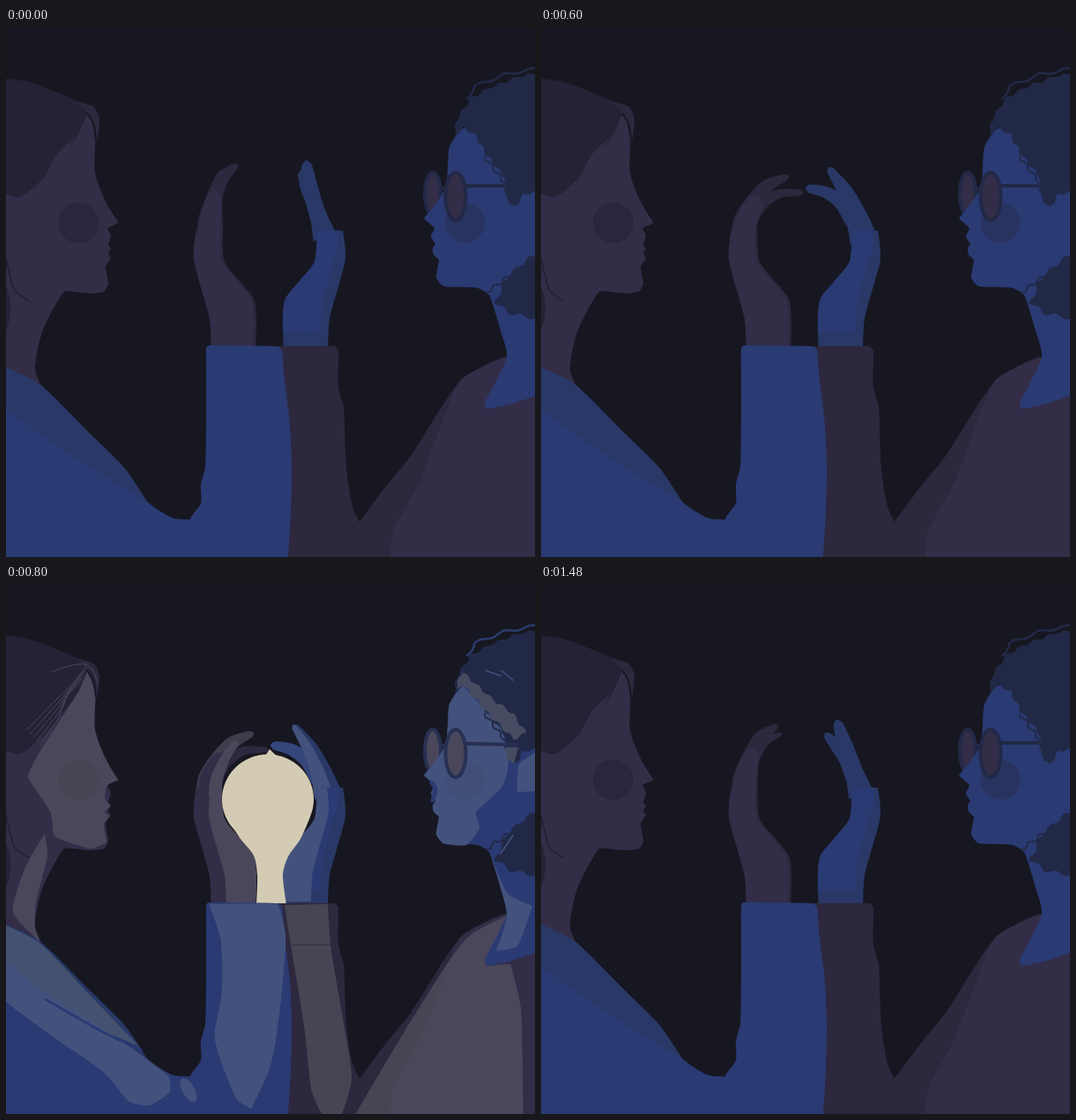
These frames come from a looping animation (600 px wide and 600 px high, 1520 ms). An HTML page with a canvas:

```html
<!DOCTYPE html>
<html lang="en">
<head>
<meta charset="utf-8">
<title>Hands around a light</title>
<style>
html, body { margin: 0; width: 100%; height: 100%; overflow: hidden; background: #171721; }
canvas { display: block; width: 600px; height: 600px; }
</style>
</head>
<body>
<canvas id="stage" width="600" height="600"></canvas>
<script>
const ctx = document.getElementById('stage').getContext('2d');
const LOOP = 1520, STEP = 40;
const night = '#171721', plum = '#332d48', plumDark = '#2d283e', plumLit = '#4a475b', greyLit = '#474553';
const blue = '#2a3a73', blueDark = '#293866', blueLit = '#43527c';
const hairL = '#242235', hairR = '#222947', hairLit = '#474b62', glow = '#d3cbb3', wire = '#e9e3cb';

const points = s => typeof s === 'string' ? s.trim().split(/\s+/).map(p => p.split(',').map(Number)) : s;
const mix = (a, b, k) => a.map((v, i) => v + (b[i] - v) * k);

// Smooth curve through the points; the sharper a turn, the less it is rounded.
function trace(shape, closed) {
  const pts = points(shape), n = pts.length;
  const at = i => closed ? pts[(i + n) % n] : pts[Math.max(0, Math.min(n - 1, i))];
  const handle = i => {
    const [a, b, c] = [at(i - 1), at(i), at(i + 1)];
    const u = [b[0] - a[0], b[1] - a[1]], v = [c[0] - b[0], c[1] - b[1]];
    const lu = Math.hypot(...u) || 1, lv = Math.hypot(...v) || 1;
    const straight = Math.max(0, (u[0] * v[0] + u[1] * v[1]) / (lu * lv));
    const k = Math.min(lu, lv) / 6 * straight;
    return [k * (u[0] / lu + v[0] / lv), k * (u[1] / lu + v[1] / lv)];
  };
  ctx.beginPath();
  ctx.moveTo(...pts[0]);
  for (let i = 0; i < n - (closed ? 0 : 1); i++) {
    const b = at(i), c = at(i + 1), h = handle(i), g = handle(i + 1);
    ctx.bezierCurveTo(b[0] + h[0], b[1] + h[1], c[0] - g[0], c[1] - g[1], ...c);
  }
  if (closed) ctx.closePath();
}
function fill(color, shape) {
  trace(shape, true);
  ctx.fillStyle = color;
  ctx.fill();
}
function line(color, width, shape) {
  trace(shape, false);
  ctx.strokeStyle = color;
  ctx.lineWidth = width;
  ctx.lineCap = ctx.lineJoin = 'round';
  ctx.stroke();
}
function oval(color, x, y, rx, ry, turn = 0, rim) {
  ctx.beginPath();
  ctx.ellipse(x, y, rx, ry, turn, 0, 2 * Math.PI);
  ctx.fillStyle = color;
  ctx.fill();
  if (!rim) return;
  ctx.strokeStyle = rim;
  ctx.lineWidth = 4;
  ctx.stroke();
}
// The same outline, shifted and clipped to itself, leaves a band of shade.
function shade(shape, color, dx, dy) {
  ctx.save();
  trace(shape, true);
  ctx.clip();
  ctx.translate(dx, dy);
  fill(color, shape);
  ctx.restore();
}
// Wavy hair edge along a few points.
function ripple(shape, height, wave) {
  const pts = points(shape), out = [];
  let run = 0;
  for (let i = 0; i < pts.length - 1; i++) {
    const [x, y] = pts[i], dx = pts[i + 1][0] - x, dy = pts[i + 1][1] - y, len = Math.hypot(dx, dy);
    for (let d = 0; d < len; d += 4) {
      const s = height * Math.sin((run + d) / wave * 2 * Math.PI);
      out.push([x + (dx * d - dy * s) / len, y + (dy * d + dx * s) / len]);
    }
    run += len;
  }
  return [...out, pts[pts.length - 1]];
}
// Tapered finger along a spine of x, y, width.
function limb(color, spine, scale = 1) {
  const near = [], far = [];
  spine.forEach(([x, y, w], i) => {
    const a = spine[Math.max(0, i - 1)], b = spine[Math.min(spine.length - 1, i + 1)];
    const dx = b[0] - a[0], dy = b[1] - a[1], k = w * scale / 2 / Math.hypot(dx, dy);
    near.push([x - dy * k, y + dx * k]);
    far.unshift([x + dy * k, y - dx * k]);
    if (i === spine.length - 1) near.push([x + dx * k, y + dy * k]);
  });
  fill(color, [...near, ...far]);
}

const palm = '233,364 231,330 213,262 216,230 245,230 248,265 266,288 281,307 284,330 283,364';
const finger = (open, cupped) => ({ open: points(open), cupped: points(cupped) });
const fingers = {
  leftIndex: finger('231,240,30 232,218,28 237,190,18 247,168,15 261,156,6', '230,240,30 232,220,28 243,197,21 257,179,15 278,169,7'),
  leftThumb: finger('237,205,14 240,190,12 247,172,10 260,160,4', '239,220,12 250,200,14 270,188,10 295,187,6'),
  rightIndex: finger('362,238,28 353,208,18 344,178,18 341,155,11', '366,240,32 357,212,24 344,184,17 328,161,8'),
  rightThumb: finger('352,220,12 346,196,13 340,180,13 335,165,8', '353,222,14 341,198,17 322,186,13 304,182,9')
};

function hands(bend, lit) {
  const spine = name => fingers[name].open.map((p, i) => mix(p, fingers[name].cupped[i], bend));
  const leftIndex = spine('leftIndex'), rightIndex = spine('rightIndex');

  limb(plumDark, spine('leftThumb'));
  limb(lit ? '#3f3c4b' : plumDark, leftIndex);
  fill(plumDark, palm);
  shade(palm, plum, -3, 0);
  limb(plum, leftIndex.slice(0, 3), .85);
  if (lit) {
    limb(plumLit, leftIndex.slice(0, 4).map(([x, y, w]) => [x + w / 4, y, w / 2]));
    shade(palm, plumLit, 17, 0);
  }

  limb(lit ? '#35467c' : blueDark, spine('rightThumb'));
  limb(blueDark, rightIndex);
  if (lit) limb(blueLit, rightIndex.map(([x, y, w]) => [x - w / 6, y, w * .67]));
  ctx.save();
  ctx.translate(598, 0);
  ctx.scale(-1, 1);
  fill(blueDark, palm);
  shade(palm, blue, 8, -18);
  if (lit) shade(palm, blueLit, 19, -5);
  ctx.restore();
}

function bulb(filament) {
  oval(glow, 297, 243, 52, 51);
  fill(glow, '283,198 295,192 299,186 305,192 315,198');
  fill(glow, '250,263 266,288 281,307 285,330 284,362 318,362 314,328 320,308 334,288 345,263');
  if (!filament) return;
  line(wire, 4, '282,257 284,264 290,264 293,256 299,263 304,256 308,263 314,262 315,255');
  line(wire, 1.5, '289,265 293,290 295,311');
  line(wire, 1.5, '308,265 302,303');
}

function leftWoman(lit) {
  fill(plum, `-20,80 92,92 101,122 101,164 113,197 128,221 115,227 119,236 116,246 119,250 116,256 119,261
    113,271 116,290 111,299 96,301 66,299 41,345 33,388 42,410 -20,410`);
  if (lit) {
    fill(plumLit, `92,98 101,122 101,164 113,197 127,221 115,227 112,242 118,250 112,258 118,262 111,271
      114,292 96,299 55,285 50,257 25,218 35,195 84,118`);
    fill(plumLit, '44,282 47,307 34,360 33,388 40,406 8,372 20,325');
  }
  oval(lit ? greyLit : '#2b2640', 82, 221, 23, 23);
  fill(hairL, '-20,55 25,61 55,72 85,85 93,94 80,124 45,168 15,192 -20,178');
  fill(plumDark, '80,83 99,89 106,102 103,131 94,99');
  line(night, 2, '92,97 99,108 102,127');
  oval(hairL, -9, 318, 14, 32);
  line(hairL, 2, '0,262 10,298 25,309');
  if (lit) {
    for (let i = 0; i < 5; i++) {
      line('#4b475d', 1, [[91 - i, 92 + i * 4], [78 - i * 2, 109 + i * 4], [55 + i, 132 + i * 5], [23 + i * 4, 165 + i * 4]]);
    }
    line('#4b475d', 1, '50,99 75,91 90,90 99,97 104,112');
  } else {
    fill(plum, '78,124 58,143 44,169 66,145');
  }

  const shoulder = '-20,376 0,385 38,404 95,460 135,500 160,537';
  fill(blue, shoulder + ' 190,556 212,558 225,620 -20,620');
  fill(blueDark, shoulder + ' 60,475 -20,415');
  if (lit) {
    fill('#445170', '-20,378 35,404 95,465 151,523 80,490 -20,410');
    fill(blueLit, '-20,412 45,462 132,518 185,558 186,575 163,590 140,586 110,552 50,510 -20,455');
    line(blue, 3, '45,470 110,507 153,527');
  }
}

function rightWoman(lit) {
  const rim = lit ? '#283052' : hairR, lens = lit ? plumLit : plum;
  fill(plumDark, `308,361 373,361 377,366 377,408 383,430 386,500 393,543 401,560 430,521 460,484
    515,401 568,373 620,400 620,620 308,620`);
  fill(plum, '620,355 568,373 515,400 470,513 438,575 436,620 620,620');
  if (lit) {
    fill(plumLit, '388,615 447,515 507,420 528,396 568,375 544,432 572,430 584,480 587,620');
    fill(greyLit, '388,615 447,515 503,430 470,513 438,575 436,620');
    fill(greyLit, '316,363 365,362 368,408 380,480 392,560 380,602 360,602 347,575 338,500 323,408');
    line(plumDark, 1, '325,408 368,408');
  }

  oval(lens, 484, 188, 9, 24, 0, rim);
  const profile = '518,114 503,135 498,182 474,216 486,227 482,237 487,245 484,250 485,257 491,263 488,283 496,293';
  fill(blue, profile + ' 535,295 548,303 560,340 568,373 543,425 545,432 570,427 620,408 620,110');
  if (lit) {
    fill(blueLit, profile + ' 522,295 537,276 533,258 563,228 570,200 562,165');
    line(blue, 5, '483,224 487,232 484,244');
    fill(blueLit, '620,178 582,203 580,235 620,232');
    fill(blueLit, '548,302 569,350 597,364 580,410 556,415 568,373');
  }
  oval(lit ? '#404e78' : '#283360', 521, 221, 22.5, 22.5);
  fill(hairR, [
    ...ripple('620,184 588,188 577,204 567,192 565,168 545,144 532,121 518,113', 1.5, 16),
    ...ripple('508,124 512,102 527,80 550,67 585,54 620,50', 1.5, 18)
  ]);
  line(lit ? '#2a3a6c' : hairR, 2.5, ripple('523,80 532,66 565,53 602,46', 1.5, 30));
  line(hairR, 2, ripple('543,146 566,176', 2, 15));
  fill(hairR, ripple('620,250 590,263 568,283 555,311 570,323 620,334', 2, 22));
  line(hairR, 2, ripple('545,300 574,279', 2, 15));
  if (lit) {
    fill(hairLit, ripple('509,121 517,98 550,128 575,146 590,168 576,175 545,144 518,113', 1.5, 18));
    fill(hairLit, '566,184 581,184 576,203 569,197');
    line(blueLit, 1.5, '544,97 561,103');
    line(blueLit, 1.5, '562,97 575,108');
    line(blueLit, 1.5, '561,305 575,284');
  }
  line(rim, 4, '494,182 499,182');
  line(rim, 4, lit ? '522,180 578,181' : '522,179 564,179');
  oval(lens, 510, 191, 11.5, 27, 0, rim);
}

function leftSleeve(lit) {
  fill(blue, `227,364 229,360 308,361 313,365 316,400 322,450 324,500 323,550 320,600 319,620
    205,620 209,557 221,539 221,518 226,498 227,440`);
  if (!lit) return;
  fill(blueLit, '230,362 308,362 317,396 312,470 300,545 278,594 262,584 237,515 245,460 243,400');
  oval(blueLit, 207, 573, 7, 15, -0.5);
}

// Open, bending to cupped, a flicker, steady light, a second flicker, off.
function draw(t) {
  const bend = t < 440 ? 0 : t < 1480 ? Math.min(1, 1 / 3 + (t - 440) / 240) : 1 / 3;
  const dark = [[0, 640], [680, 720], [760, 800], [1200, 1240], [1320, 1360], [1480, LOOP]];
  const lit = !dark.some(([from, to]) => t >= from && t < to);
  ctx.fillStyle = night;
  ctx.fillRect(0, 0, 600, 600);
  leftWoman(lit);
  hands(bend, lit);
  if (lit) bulb(t === 640);
  rightWoman(lit);
  leftSleeve(lit);
}

let shown = -1;
const start = performance.now();
function tick(now) {
  const t = Math.floor(Math.max(0, now - start) % LOOP / STEP) * STEP;
  if (t !== shown) draw(shown = t);
  requestAnimationFrame(tick);
}
draw(0);
requestAnimationFrame(tick);
</script>
</body>
</html>
```
